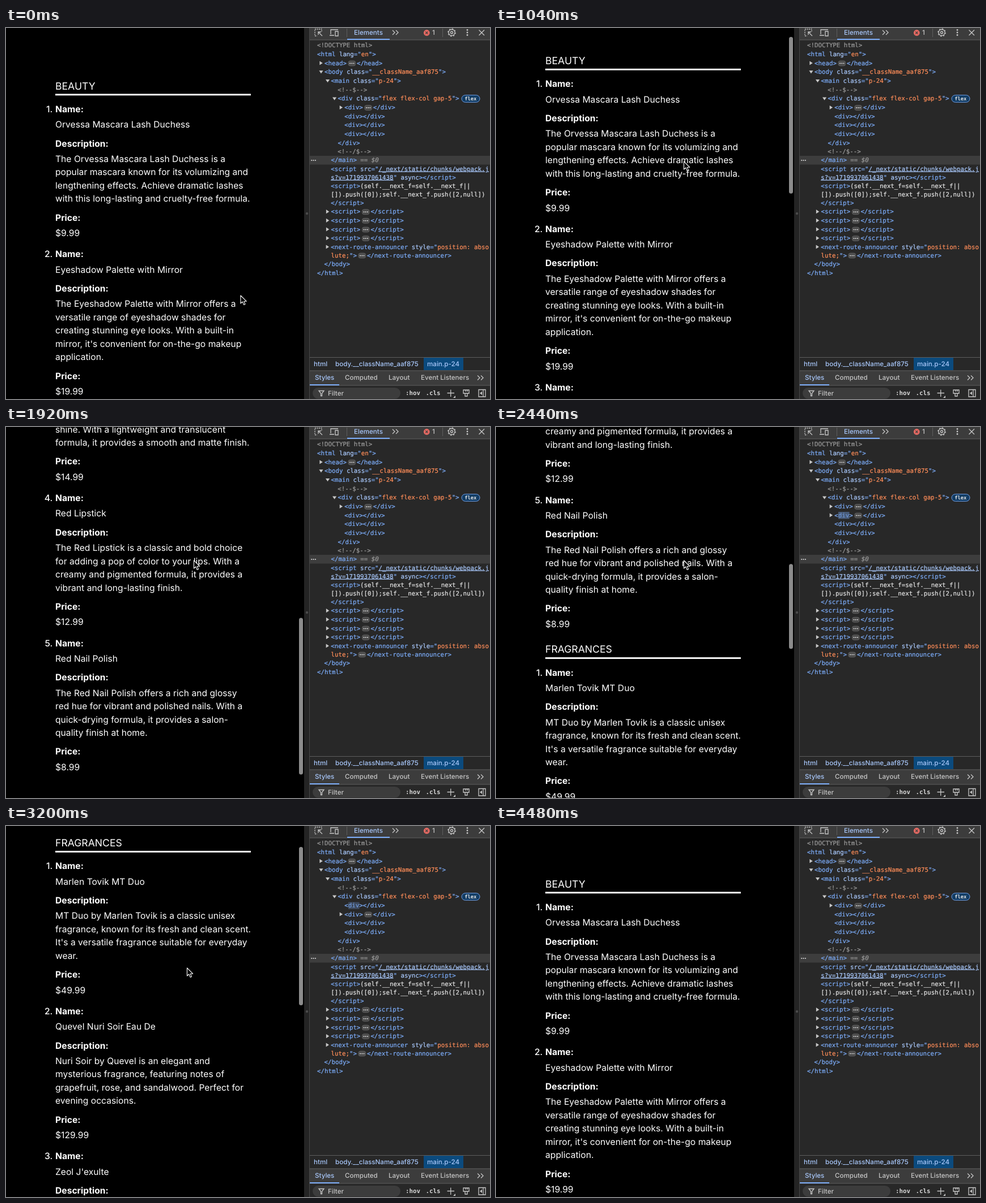
These frames come from a looping animation (854 px wide and 656 px high, 4.68 s). An HTML page:

```html
<!DOCTYPE html>
<html lang="en">
<head>
<meta charset="utf-8">
<title>Product list with inspector</title>
<style>
  html, body { margin: 0; width: 100%; height: 100%; overflow: hidden; background: #000; }
  svg { display: block; width: 854px; height: 656px; }
  text { white-space: pre; text-rendering: geometricPrecision; font-optical-sizing: none; }
  .page text { font: 445 15.67px Inter, sans-serif; fill: #fff; }
  .page .title { font-size: 17.6px; }
  .page .label { font-weight: 700; }
  .page .num { font-weight: 500; text-anchor: end; }
  .code text { font: 10.77px "DejaVu Sans Mono", monospace; fill: var(--ink); stroke: var(--ink); stroke-width: .22; }
  .ui text { font: 500 11.6px Inter, sans-serif; fill: #c7c7c7; }
  .ui .blue { fill: #a8c7fa; }
  .ui .mono { font: 700 10.77px "DejaVu Sans Mono", monospace; fill: #d6d6d6; }
  .t { --ink: #7cacf8; }
  .a { --ink: #a8c7fa; }
  .v { --ink: #fe8d59; }
  .c { --ink: #9a9a9a; }
  .w { --ink: #e3e3e3; }
  .u { --ink: #a8c7fa; text-decoration: underline; }
  .code .i { --ink: #9a9a9a; font-style: italic; }
  .code .badge { font-size: 8.8px; font-weight: 700; stroke: none; }
  .icon { fill: none; stroke: #c7c7c7; stroke-width: 1.3; }
</style>
</head>
<body>
<svg viewBox="0 0 854 656">
  <rect width="854" height="656"/>
  <g class="page" id="page"></g>
  <rect id="thumb" x="517" width="7" rx="3.5" fill="#8b8b8b"/>

  <rect x="526" width="10" height="656" fill="#242424"/>
  <rect x="535" width="1" height="656" fill="#484848"/>
  <circle cx="531" cy="328" r="2.2" fill="#4c4c4c"/>
  <rect x="536" width="318" height="656" fill="#282828"/>
  <rect x="536" y="226" width="318" height="15.5" fill="#3d3d3d"/>
  <g class="code" id="code"></g>

  <g class="ui">
    <rect x="536" width="318" height="21" fill="#3c3c3c"/>
    <rect x="536" y="20.5" width="318" height="1" fill="#5e5e5e"/>
    <rect x="602" y="19" width="75" height="2" fill="#7cacf8"/>
    <path stroke="#5e5e5e" d="M601.5 1V16M770.5 1V16"/>
    <path class="icon" stroke-dasharray="2 1.5" d="M557 6V2H545V14H549"/>
    <path class="icon" d="M558 14L551 7M551 12V7H556"/>
    <path class="icon" d="M573 11V3H586M571 13H579M581 6H586V14H581Z"/>
    <text class="blue" x="614" y="11.6">Elements</text>
    <path class="icon" d="M682 4L686 8L682 12M688 4L692 8L688 12"/>
    <circle cx="742.3" cy="8.5" r="5.4" fill="#e46962"/>
    <path stroke="#3c3c3c" stroke-width="1.3" d="M740.2 6.4L744.4 10.6M744.4 6.4L740.2 10.6"/>
    <text x="752" y="12.4">1</text>
    <circle class="icon" cx="786.5" cy="8" r="5.5"/>
    <circle class="icon" cx="786.5" cy="8" r="6.6" stroke-dasharray="2.6 2.6"/>
    <circle class="icon" cx="786.5" cy="8" r="2"/>
    <g fill="#c7c7c7"><circle cx="814" cy="3.5" r="1.4"/><circle cx="814" cy="8" r="1.4"/><circle cx="814" cy="12.5" r="1.4"/></g>
    <path class="icon" d="M834.5 3.5L844 13M844 3.5L834.5 13"/>

    <rect x="536" y="582" width="318" height="1" fill="#5e5e5e"/>
    <rect x="737" y="583" width="70" height="22" fill="#0b4a7d"/>
    <text class="blue" x="543" y="597.8">html</text>
    <text class="blue" x="581" y="597.8">body.__className_aaf875</text>
    <text class="blue" x="743" y="597.8">main.p-24</text>

    <rect x="536" y="605.5" width="318" height="26.5" fill="#3c3c3c"/>
    <rect x="536" y="605.5" width="318" height="1" fill="#5e5e5e"/>
    <rect x="536" y="631.5" width="318" height="1" fill="#5e5e5e"/>
    <rect x="536" y="630" width="52" height="2" fill="#7cacf8"/>
    <text class="blue" x="545" y="622.4">Styles</text>
    <text x="598" y="622.4">Computed</text>
    <text x="675" y="622.4">Layout</text>
    <text x="732" y="622.4">Event Listeners</text>
    <path class="icon" d="M832 614.5L836 618.5L832 622.5M838 614.5L842 618.5L838 622.5"/>

    <rect x="541" y="636" width="155" height="19.5" rx="9.7" fill="#3c3c3c"/>
    <path class="icon" d="M552 641.5H561L557.5 646V650.5H555.5V646Z"/>
    <text x="568" y="649.8">Filter</text>
    <text class="mono" x="705" y="649.3">:hov</text>
    <text class="mono" x="740.5" y="649.3">.cls</text>
    <path class="icon" d="M778.5 645.5H791M784.7 639.5V652"/>
    <path fill="#c7c7c7" d="M793 650V654H789Z"/>
    <path class="icon" d="M807 640H817V646H807ZM810 646V651H814V646M811 640V643M814 640V643"/>
    <path class="icon" d="M834 639.5H846V652H834ZM842 639.5V652"/>
    <path fill="#c7c7c7" d="M840 642.5V649L836 645.8Z"/>
  </g>
  <path id="pointer" d="M0 0V14L3.3 11 5.6 16.4 8 15.4 5.8 10.2H10.2Z" stroke="#fff" stroke-width="1.1" stroke-linejoin="round"/>
</svg>
<script>
const LOOP = 4680, STEP = 40, CHAR = 6.485;
const $ = id => document.getElementById(id);
const esc = s => s.replace(/&/g, '&amp;').replace(/</g, '&lt;');
const text = (cls, x, y, s) => `<text class="${cls}" x="${x}" y="${y}">${esc(s)}</text>`;

// --- product page ---
const LINE = 23.5, NEAR = 27.4, FAR = 33.3, NEXT = 37.2, BASE = 5.3;

function section(id, title, y, items) {
  let out = text('title', 87, y + 6, title) +
    `<rect x="87" y="${y + 13.9}" width="345" height="2.9" fill="#fff"/>`;
  y += 41 + BASE;
  const put = (cls, s, gap) => { out += text(cls, 87, y, s); y += gap; };
  items.forEach(([name, price, ...lines], i) => {
    out += text('num', 82.3, y, `${i + 1}.`);
    put('label', 'Name:', NEAR);
    put('', name, FAR);
    put('label', 'Description:', NEAR);
    lines.forEach((line, k) => put('', line, k < lines.length - 1 ? LINE : FAR));
    put('label', 'Price:', NEAR);
    put('', price, NEXT);
  });
  return `<g id="${id}">${out}</g>`;
}

$('page').innerHTML = section('beauty', 'BEAUTY', 102.5, [
  ['Orvessa Mascara Lash Duchess', '$9.99',
    'The Orvessa Mascara Lash Duchess is a', 'popular mascara known for its volumizing and',
    'lengthening effects. Achieve dramatic lashes', 'with this long-lasting and cruelty-free formula.'],
  ['Eyeshadow Palette with Mirror', '$19.99',
    'The Eyeshadow Palette with Mirror offers a', 'versatile range of eyeshadow shades for',
    'creating stunning eye looks. With a built-in', "mirror, it's convenient for on-the-go makeup", 'application.'],
  ['Powder Canister', '$14.99',
    'The Powder Canister is a finely milled setting', 'powder designed to set makeup and control',
    'shine. With a lightweight and translucent', 'formula, it provides a smooth and matte finish.'],
  ['Red Lipstick', '$12.99',
    'The Red Lipstick is a classic and bold choice', 'for adding a pop of color to your lips. With a',
    'creamy and pigmented formula, it provides a', 'vibrant and long-lasting finish.'],
  ['Red Nail Polish', '$8.99',
    'The Red Nail Polish offers a rich and glossy', 'red hue for vibrant and polished nails. With a',
    'quick-drying formula, it provides a salon-', 'quality finish at home.']
]) + section('fragrances', 'FRAGRANCES', 1457, [
  ['Marlen Tovik MT Duo', '$49.99',
    'MT Duo by Marlen Tovik is a classic unisex', 'fragrance, known for its fresh and clean scent.',
    "It's a versatile fragrance suitable for everyday", 'wear.'],
  ['Quevel Nuri Soir Eau De', '$129.99',
    'Nuri Soir by Quevel is an elegant and', 'mysterious fragrance, featuring notes of',
    'grapefruit, rose, and sandalwood. Perfect for', 'evening occasions.'],
  ["Zeol J'exulte", '$89.99',
    "J'exulte by Zeol is a luxurious and floral", 'fragrance, known for its blend of ylang-ylang,',
    'rose, and jasmine. It embodies femininity and', 'sophistication.']
]);

// --- element tree: tokens are "class:text", joined by ¦; "…" is a fold badge ---
function row(x, y, tokens, arrow = '') {
  let out = '';
  if (arrow) {
    const d = arrow === 'down' ? 'm-3.6 -2.3h7.2l-3.6 5.4z' : 'm-2.6 -3.6v7.2l5.4 -3.6z';
    out += `<path fill="#c7c7c7" d="M${x - 6} ${y}${d}"/>`;
  }
  for (const token of tokens.split('¦')) {
    if (token === '…') {
      out += `<rect x="${x + 3}" y="${y - 4}" width="12.8" height="9" rx="3.5" fill="#4a4a4a" stroke="#747474" stroke-width=".6"/>` +
        [6.2, 9.4, 12.6].map(dx => `<circle cx="${x + dx}" cy="${y + .5}" r="1" fill="#e3e3e3"/>`).join('');
      x += 18;
    } else {
      const s = token.slice(2);
      out += text(token[0], x, y + 3.5, s);
      x += s.length * CHAR;
    }
  }
  return out;
}

const foldable = (i, y) =>
  `<rect id="flash${i}" x="604" y="${y - 6}" width="19.5" height="12.5" fill="#7cacf8"/>` +
  `<g id="full${i}">${row(597.3, y, 't:<¦t:   ¦t:>¦…¦t:</div>', 'right')}</g>` +
  `<g id="empty${i}">${row(597.3, y, 't:<¦t:   ¦t:></div>')}</g>` +
  `<g id="word${i}">${row(597.3 + CHAR, y, 't:div')}</g>`;

$('code').innerHTML = [
  row(549, 30.5, 'c:<!DOCTYPE html>'),
  row(549, 46.2, 't:<html ¦a:lang¦t:="¦v:en¦t:">'),
  row(562, 62, 't:<head>¦…¦t:</head>', 'right'),
  row(562, 77.5, 't:<body ¦a:class¦t:="¦v:__className_aaf875¦t:">', 'down'),
  row(573.5, 93.2, 't:<main ¦a:class¦t:="¦v:p-24¦t:">', 'down'),
  row(585.3, 109, 'c:<!--$-->'),
  row(585.6, 124.7, 't:<div ¦a:class¦t:="¦v:flex flex-col gap-5¦t:">', 'down'),
  '<rect x="804" y="118.7" width="32" height="12.6" rx="6.3" fill="#123c64" stroke="#7cacf8" stroke-width=".9"/>',
  text('w badge', 809.2, 128, 'flex'),
  foldable(1, 140.5), foldable(2, 156),
  row(597.3, 171.7, 't:<div></div>'),
  row(597.3, 187.4, 't:<div></div>'),
  row(585.6, 203, 't:</div>'),
  row(585.3, 218, 'c:<!--/$-->'),
  [539.3, 542.6, 545.9].map(x => `<circle cx="${x}" cy="234" r="1.1" fill="#d6d6d6"/>`).join(''),
  row(573.5, 233.5, 't:</main>¦c: == ¦i:$0'),
  row(573.2, 249, 't:<script ¦a:src¦t:="¦u:/_next/static/chunks/webpack.j'),
  row(573.2, 264, 'u:s?v=1719937061438¦t:"¦a: async¦t:></' + 'script>'),
  row(573.2, 279.5, 't:<script>¦w:(self.__next_f=self.__next_f||'),
  row(573.2, 294, 'w:[]).push([0]);self.__next_f.push([2,null])'),
  row(573.2, 309, 't:</' + 'script>'),
  ...[324.7, 340.3, 356, 371.6].map(y => row(573.5, y, 't:<script>¦…¦t:</' + 'script>', 'right')),
  row(573.2, 387, 't:<next-route-announcer ¦a:style¦t:="¦v:position: abso', 'right'),
  row(573.5, 402, 'v:lute;¦t:">¦…¦t:</next-route-announcer>'),
  row(561.5, 417.7, 't:</body>'),
  row(549, 433.2, 't:</html>')
].join('');

// --- motion ---
function track(points, t) {
  const i = points.findIndex(p => p[0] > t);
  if (i < 0) return points[points.length - 1][1];
  if (i === 0) return points[0][1];
  const [t0, a] = points[i - 1], [t1, b] = points[i];
  return a + (b - a) * (t - t0) / (t1 - t0);
}

const scrollTrack = [[0, 0], [440, 0], [560, -10], [680, -8], [960, -1], [1000, 0],
  [1400, 445.5], [1480, 490], [1520, 490], [1800, 740], [2080, 905], [2320, 921],
  [2440, 1063.7], [2840, 1480], [3000, 1500], [3200, 1427], [3280, 1300], [3440, 780],
  [3640, 80], [3720, 0], [3760, -3], [3880, -10], [4120, -5], [4360, -1], [4480, 0]];
const pointerX = [[0, 414], [160, 331.5], [2640, 331.5], [3200, 319.5], [3760, 296.5]];
const pointerY = [[0, 473], [160, 236], [2640, 236], [3200, 251], [3760, 322.5]];
const thumbFade = [[400, 0], [480, 1], [4120, 1], [4320, 0]];

// Times at which a section is filled or emptied.
const SECOND_IN = 2320, FIRST_OUT = 2840, FIRST_IN = 3280, SECOND_OUT = 3440;

const show = (id, on) => { $(id).style.display = on ? '' : 'none'; };

function flash(i, t, changes) {
  const since = Math.min(...changes.map(c => t - c).filter(d => d >= 0), 800);
  const p = .6 * (1 - since / 800);
  $('flash' + i).style.opacity = p * .75;
  $('word' + i).style.opacity = 1 - p * .6;
}

function draw(now) {
  const t = Math.floor((now % LOOP) / STEP) * STEP;
  const scroll = track(scrollTrack, t);
  const first = t < FIRST_OUT || t >= FIRST_IN;
  const second = t >= SECOND_IN && t < SECOND_OUT;

  $('page').setAttribute('transform', `translate(0 ${-scroll})`);
  show('beauty', first);
  show('fragrances', second);
  [first, second].forEach((on, i) => {
    show('full' + (i + 1), on);
    show('empty' + (i + 1), !on);
  });
  flash(1, t, [FIRST_OUT, FIRST_IN]);
  flash(2, t, [SECOND_IN, SECOND_OUT]);

  const both = first && second;
  const local = Math.max(0, first ? scroll : scroll - 1332);
  const thumb = $('thumb');
  thumb.setAttribute('y', local * (both ? .2305 : .42) - 3);
  thumb.setAttribute('height', both ? 150 : first ? 277 : 280);
  thumb.style.opacity = track(thumbFade, t);

  $('pointer').setAttribute('transform', `translate(${track(pointerX, t)} ${track(pointerY, t)})`);
  show('pointer', t < 4360);
}

const start = performance.now();
(function tick() {
  draw(performance.now() - start);
  requestAnimationFrame(tick);
})();
</script>
</body>
</html>
```
